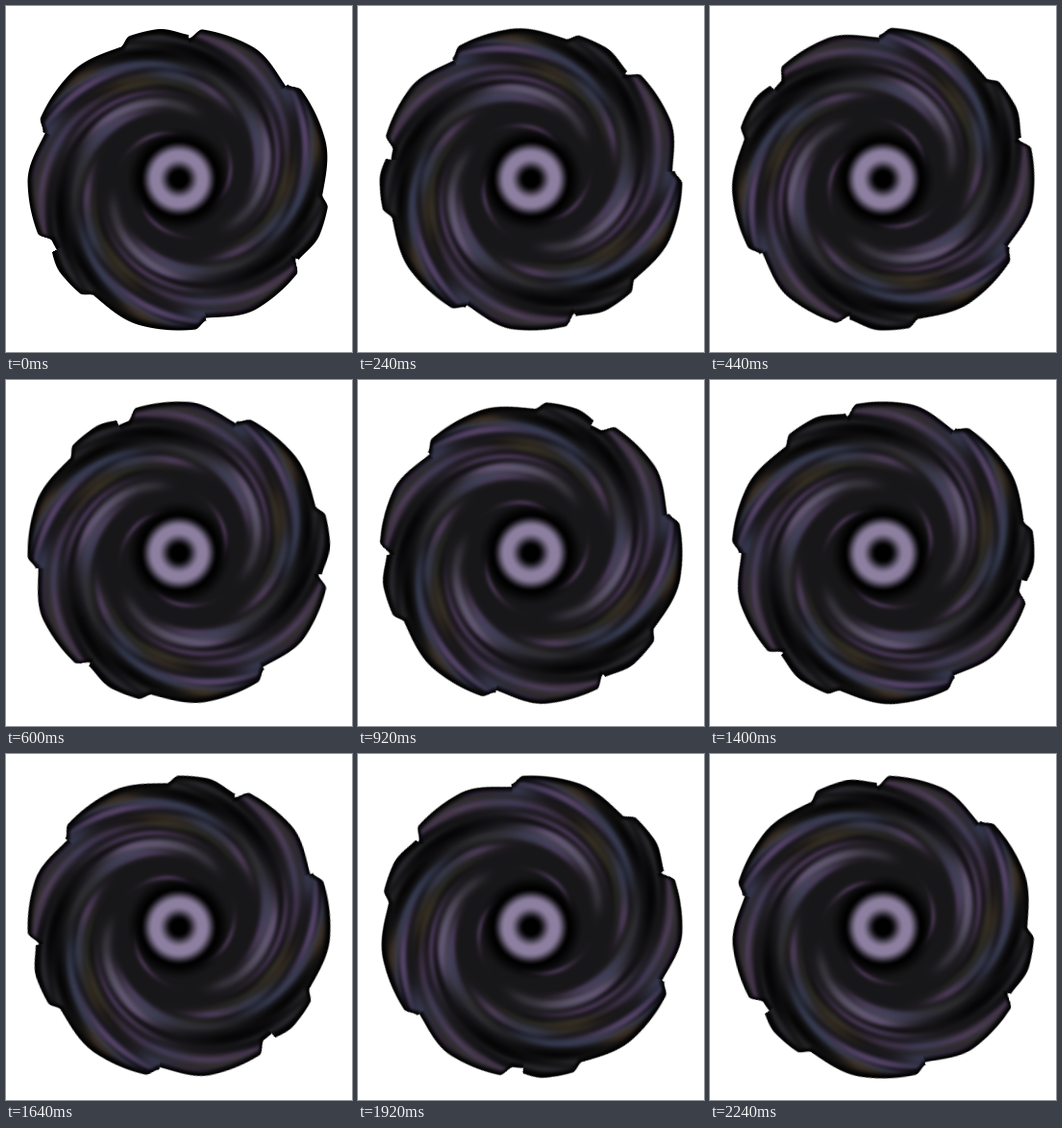
An HTML page with a canvas that plays this animation: 360x360 px, repeating every 2280 ms.

```html
<!DOCTYPE html>
<html lang="en">
<head>
<meta charset="utf-8">
<title>Vortex</title>
<style>
  html, body { margin: 0; width: 100%; height: 100%; overflow: hidden; background: #fff; }
  canvas { display: block; width: 360px; height: 360px; }
</style>
</head>
<body>
<canvas id="stage" width="360" height="360"></canvas>
<script>
const SIZE = 360, MID = 180, STEP = 40, STEPS = 57, TAU = Math.PI * 2;
const SECTOR = 120;  // degrees; the vortex repeats three times around
const PITCH = 0.24;  // how fast each streak spirals inward, clockwise

const COLORS = {
  black: [1, 1, 2], gray: [50, 48, 54], lavender: [106, 96, 124], purple: [92, 68, 108],
  slate: [56, 62, 86], olive: [47, 47, 38], brown: [76, 60, 42]
};

const makeStreak = (color, bearing, radius, length, width, strength) =>
  ({ color: COLORS[color], bearing, radius, length, width, strength });

const KEY_STREAKS = [
  makeStreak("black", 14, 128, 22, 7, .8),
  makeStreak("black", 105, 136, 18, 6, .8),
  makeStreak("slate", 116, 110, 12, 8, .6),
  makeStreak("slate", 50, 144, 8, 7, .75),
  makeStreak("brown", 76, 147, 9, 6, .6),
  makeStreak("brown", 93, 112, 14, 7, .45),
  makeStreak("purple", 72, 138, 20, 4, .8),
  makeStreak("purple", 30, 141, 16, 4, .6),
  makeStreak("purple", 80, 104, 28, 3.5, .65),
  makeStreak("purple", 90, 52, 26, 3, .65),
  makeStreak("lavender", 82, 91, 29, 6, .8)
];

function makeRandom(seed) {
  return () => (seed = seed * 16807 % 2147483647) / 2147483647;
}

function fillStreaks() {
  const random = makeRandom(71);
  const names = ["black", "gray", "olive", "black", "slate", "gray", "purple"];
  return Array.from({ length: 49 }, (_, i) => makeStreak(
    names[i % names.length], SECTOR * random(), 46 + 110 * Math.sqrt(random()),
    11 + 14 * random(), 2.5 + 3.5 * random(), .5 + .3 * random()));
}

const smooth = (from, to, v) => {
  const t = Math.min(1, Math.max(0, (v - from) / (to - from)));
  return t * t * (3 - 2 * t);
};

// Three lobes per sector: each jumps out, then sinks back clockwise.
function edgeRadius(bearing) {
  const at = (bearing % SECTOR + SECTOR - 4) % SECTOR;
  const [start, end] = at < 45 ? [0, 45] : at < 92 ? [45, 92] : [92, SECTOR];
  const t = (at - start) / (end - start);
  const low = start ? 150 : 147;
  return low + (157.5 - low) * smooth(0, 5, at - start) * (1 - smooth(.55, 1.05, t));
}

function shade(r, bearing, edge, streaks) {
  let rgb = [23, 22, 24];
  for (const s of streaks) {
    let turn = bearing - s.bearing;
    turn -= SECTOR * Math.round(turn / SECTOR);
    const along = turn / s.length;
    if (Math.abs(along) > 2.4) continue;
    const across = (r - s.radius * Math.exp(-PITCH * turn * TAU / 360)) / s.width;
    if (Math.abs(across) > 2.4) continue;
    const mix = s.strength * Math.exp(-along * along - across * across);
    rgb = rgb.map((v, i) => v + (s.color[i] - v) * mix);
  }
  const body = smooth(38, 56, r) * smooth(0, 8, edge - r);
  const ring = smooth(7, 22, r) * (1 - smooth(27, 40, r));
  return rgb.map((v, i) => v * body + [140, 127, 159][i] * ring);
}

function paintVortex() {
  const canvas = document.createElement("canvas");
  canvas.width = canvas.height = SIZE;
  const ctx = canvas.getContext("2d");
  const image = ctx.createImageData(SIZE, SIZE);
  const streaks = [...fillStreaks(), ...KEY_STREAKS];
  for (let y = 0; y < SIZE; y++) {
    for (let x = 0; x < SIZE; x++) {
      const dx = x + .5 - MID, dy = y + .5 - MID;
      const r = Math.hypot(dx, dy);
      const bearing = Math.atan2(dx, -dy) * 360 / TAU;
      const edge = edgeRadius(bearing);
      if (r > edge + .5) continue;
      const alpha = 255 * Math.min(1, edge + .5 - r);
      image.data.set([...shade(r, bearing, edge, streaks), alpha], (y * SIZE + x) * 4);
    }
  }
  ctx.putImageData(image, 0, 0);
  return canvas;
}

const stage = document.getElementById("stage").getContext("2d");
const vortex = paintVortex();

function draw(time) {
  const step = Math.floor(time / STEP) % STEPS;
  stage.setTransform(1, 0, 0, 1, 0, 0);
  stage.clearRect(0, 0, SIZE, SIZE);
  stage.translate(MID, MID);
  stage.rotate(step / STEPS * TAU);
  stage.drawImage(vortex, -MID, -MID);
}

function tick() {
  draw(performance.now());
  requestAnimationFrame(tick);
}
tick();
</script>
</body>
</html>
```
